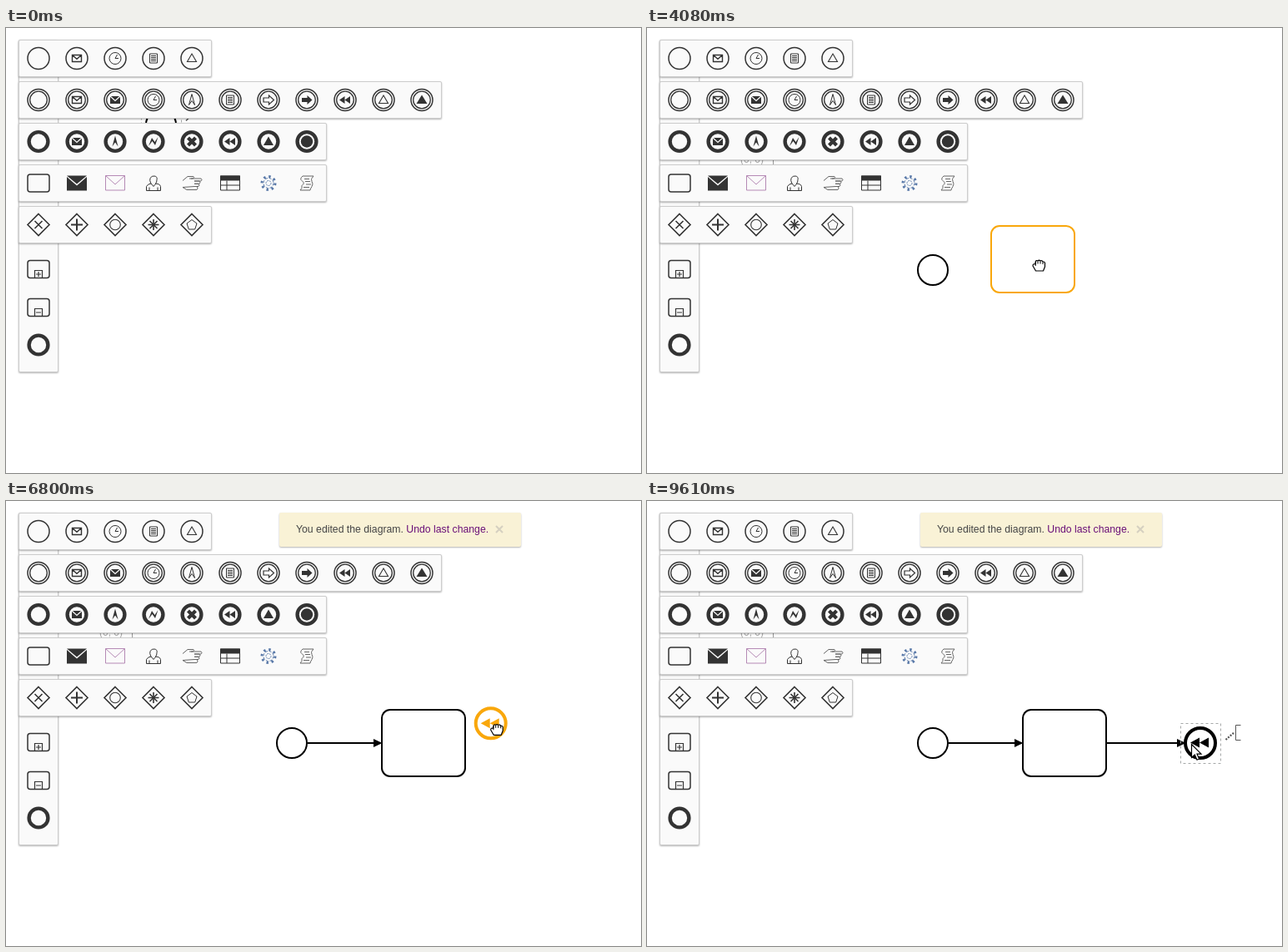
Write an HTML page that moves like this. It is 762 px wide and 535 px high and loops after 9.71 s.

```html
<!DOCTYPE html>
<html lang="en">
<head>
<meta charset="utf-8">
<title>Process modeler</title>
<style>
  html, body { margin: 0; width: 100%; height: 100%; overflow: hidden; background: #fff; }
  #stage { position: relative; width: 762px; height: 535px; overflow: hidden; }
  svg { position: absolute; left: 0; top: 0; }
  .panel {
    position: absolute; left: 15px; box-sizing: border-box; background: #fafafa;
    border: 1px solid #ccc; border-radius: 2px; box-shadow: 0 1px 2px rgba(0, 0, 0, .3);
  }
  .note {
    position: absolute; left: 328px; top: 14px; width: 290px; height: 41px;
    background: #f9f2d6; border-radius: 2px; box-shadow: 0 1px 2px rgba(0, 0, 0, .3);
  }
  .note text { font: 12.25px "Liberation Sans", Arial, sans-serif; fill: #444; }
  .note .link { fill: #6a1078; }
  .icon { fill: none; stroke: currentColor; stroke-width: 1.4; color: #333; }
  .icon .f { fill: currentColor; stroke: none; }
  .icon .w { stroke: #fafafa; }
  .shape { fill: #fff; stroke: #000; stroke-width: 2; }
  .ghost { fill: none; stroke: #f9a70b; color: #f9a70b; stroke-width: 2; }
  .outline { fill: none; stroke: #a5a8a8; stroke-dasharray: 3 3; }
  .pad { fill: none; stroke: #555; }
  .snap { stroke: rgba(255, 195, 66, .5); stroke-width: 2; }
  .edge { stroke: #000; stroke-width: 2; }
  .preview { stroke: #333; stroke-width: 2; stroke-dasharray: 1; }
  .origin { stroke: #999; fill: none; }
  .origin text { font: 12px "Liberation Sans", Arial, sans-serif; fill: #aaa; stroke: none; }
</style>
</head>
<body>
<div id="stage">
  <svg width="762" height="535">
    <g id="origin" class="origin">
      <path d="M151.500 154v20M141 164.500h20"/>
      <text x="140" y="161.500" text-anchor="end">(0, 0)</text>
    </g>
    <g id="edge1" class="edge"><path d="M362 291h80"/><path d="M441 286l10.500 5-10.500 5z" stroke="none"/></g>
    <g id="edge2" class="edge"><path d="M552 291h86"/><path d="M636 286l10.500 5-10.500 5z" stroke="none"/></g>
    <g id="start">
      <circle class="shape" cx="343" cy="291" r="18"/>
      <rect id="startOutline" class="outline" x="319.500" y="267.500" width="48" height="48"/>
      <g id="startPad" class="pad" transform="translate(372 269)"></g>
    </g>
    <g id="task">
      <rect id="taskBox" class="shape" x="451" y="251" width="100" height="80" rx="10"/>
      <rect id="taskOutline" class="outline" x="445.500" y="245.500" width="112" height="92"/>
      <g id="taskPad" class="pad" transform="translate(562 247)"></g>
    </g>
    <g id="end">
      <circle id="endRing" class="shape" cx="664" cy="291" r="18" style="stroke-width:4"/>
      <path d="M652 290.500l11-6v12zM663 290.500l11-6v12z"/>
      <rect id="endOutline" class="outline" x="640.500" y="267.500" width="48" height="48"/>
      <g id="endPad" class="pad" transform="translate(693 245)"></g>
    </g>
    <line id="preview" class="preview" y1="291"/>
    <path id="snapX" class="snap" d="M343 0v535"/>
    <path id="snapY" class="snap" d="M0 291h762"/>
    <rect id="taskGhost" class="ghost" x="-50" y="-40" width="100" height="80" rx="10"/>
    <g id="endGhost" class="ghost">
      <circle r="18" stroke-width="4"/>
      <path d="M-12 0l11-6v12zM-1 0l11-6v12z" fill="currentColor" stroke="none"/>
    </g>
  </svg>
  <div id="panels"></div>
  <svg id="icons" width="762" height="535"></svg>
  <div id="note" class="note">
    <svg width="290" height="41">
      <text x="20" y="24">You edited the diagram. <tspan class="link">Undo last change.</tspan></text>
      <path d="M260 16l8 8M268 16l-8 8" stroke="#d5d0c0" stroke-width="2"/>
    </svg>
  </div>
  <svg width="762" height="535">
    <path id="arrow" d="M.5 .5V16.500L4.300 13 7 19.200 9.600 18 7 12.200H12z" fill="#fff" stroke="#000" stroke-width="1.200"/>
    <g id="fist" fill="#fff" stroke="#000" stroke-width="1.200" stroke-linejoin="round">
      <path d="M3 6Q0 5 0 8L3.500 14H12.500L14.500 9V4.500Q14 2.500 12 3.200 11 1 9 2 7.500 .5 6 2 4 .8 3.300 3z"/>
      <path d="M3.200 3V8M6 2.500V5.500M9 2.500V5.500M12 3.500V6" stroke-width="1"/>
    </g>
  </svg>
</div>
<script>
const LOOP = 9710;
const $ = id => document.getElementById(id);

// Glyphs, each centred on 0,0
const ring = (r, w = 1.5) => `<circle r="${r}" stroke-width="${w}"/>`;
const line = (d, w = 1.2) => `<path d="${d}" stroke-width="${w}"/>`;
const fill = d => `<path class="f" d="${d}"/>`;
const TRI = 'M0-5.500L5.500 4H-5.500z';
const ESC = 'M0-7L3.500 6 0 1-3.500 6z';
const ARROW = 'M-6-2.500H.5V-5.500L6.500 0 .5 5.500V2.500H-6z';
const BOX = 'M-10-10.500H10Q13-10.500 13-7.500V7.500Q13 10.500 10 10.500H-10Q-13 10.500-13 7.500V-7.500Q-13-10.500-10-10.500z';
const mail = line('M-5.500-4H5.500V4H-5.500zM-5.500-4L0 .8 5.500-4', 1.4);
const mailFull = fill('M-6-4.500H6V4.500H-6z') + '<path class="w" d="M-6-4.500L0 1 6-4.500" stroke-width="1.200"/>';
const clock = ring(7, 1) + line('M4 0H0L2.500-4.500', 1);
const doc = line('M-4.500-5.500H4.500V5.500H-4.500zM-3-3H3M-3-1H3M-3 1H3M-3 3H3', 1);
const rewind = fill('M-7 0L-.5-4.500V4.500zM-.5 0L6-4.500V4.500z');
const thin = ring(13);
const double = ring(13) + ring(10.3, 1.3);
const thick = ring(11.4, 4.4);
const diamond = line('M0-13L13 0 0 13-13 0z', 1.6);
const around = (base, list) => list.map(g => base + g);
const cross = w => line('M-4.500-4.500L4.500 4.500M4.500-4.500L-4.500 4.500', w);

const rows = [
  around(thin, ['', mail, clock, doc, line(TRI, 1.1)]),
  around(double, ['', mail, mailFull, clock, line(ESC, 1), doc, line(ARROW), fill(ARROW), rewind,
    line(TRI, 1.1), fill('M0-6L6.500 4.500H-6.500z')]),
  around(thick, ['', mailFull, fill(ESC), fill('M-6 5.500L-2-4.500 1.500 .5 5.500-5.500 2 4.500-1.500-.5z'),
    cross(4.2), rewind, fill('M0-6L6 4.500H-6z'), '<circle class="f" r="7.200"/>']),
  [
    line(BOX, 1.5),
    fill('M-12-9H12L0 1zM-12-7.500L0 3 12-7.500V9H-12z'),
    '<path d="M-11.500-9H11.500V8.500H-11.500zM-11.500-9L0 1.500 11.500-9" stroke="#b58ab5" stroke-width="1"/>',
    line('M-8.500 9V4Q-7 1-3 .5Q-5-3-4-6Q-2-9 1-8.500Q5-8 4-4Q4-1 2.500.5Q8 1 8.500 4V9zM-5 9V5M5 9V5M-3 .5L0 4 3 .5', 1),
    '<path d="M-11-3L-5-8H2Q4-7 1-5.500H-3M-1-5.500H11Q13-4 11-2.500H3M3-2.500H9Q11-1 9 .8H3M3 .8H8Q10 2.500 8 4H3M3 4H6Q8 6 6 8H-6L-11 5z" stroke="#666" stroke-width="1"/>',
    line('M-11.500-8.500H11.500V8.500H-11.500zM-4-3V8.500M-11.500 2.500H11.500', 1) + fill('M-12-9H12V-3H-12z'),
    `<g stroke="#5878a8"><circle r="8" stroke-width="3" stroke-dasharray="2.500 3.780"/>
      <circle r="6" stroke-width="1" stroke-dasharray="3 1.700"/><circle r="3" stroke-width="1" stroke-dasharray="2 1"/></g>`,
    '<path d="M-5-8.500H8Q4-5 6-2T6 4T4 8.500H-8Q-5 6-6 3L-4 1Q-3-1-6-3T-5-8.500M-3-5H3M-2-2H4M-1 1.500H5M-4 5H3" stroke="#666" stroke-width="1"/>'
  ],
  around(diamond, [cross(1.6), line('M0-7V7M-7 0H7', 2), ring(6.3, 1.1),
    line('M0-6.500V6.500M-6.500 0H6.500', 1.6) + cross(1.6),
    line('M0-6L6-1.500 3.700 5.500H-3.700L-6-1.500z', 1)])
];
const sub = mark => line(BOX, 1.5) + line('M-4.500 10.500V1.500H4.500V10.500' + mark, 1.2);
const column = [[290, sub('M-3 6H3M0 3V9')], [336, sub('M-3 6H3')], [381, thick]];

const panel = (y, w, h) => `<div class="panel" style="top:${y}px;width:${w}px;height:${h}px"></div>`;
const icon = (x, y, body, id) => `<g class="icon" id="${id}" transform="translate(${x} ${y})">${body}</g>`;
$('panels').innerHTML = panel(14, 48, 400) +
  rows.map((r, i) => panel(14 + 50 * i, r.length * 46 + 2, 45)).join('');
$('icons').innerHTML =
  rows.map((r, i) => r.map((g, j) => icon(39 + 46 * j, 36.5 + 50 * i, g, `icon${i}_${j}`)).join('')).join('') +
  column.map(([y, g], i) => icon(39, y, g, 'column' + i)).join('');

const annotate = `<path d="M19.500 24.500H13.500V42.500H19.500"/>
  <path d="M1.500 42L12 33" stroke-width="2.200" stroke-dasharray="2 1.500"/>`;
const connect = '<path d="M1 17.500L13 5.500" stroke-width="1.400"/><path d="M18 0L14.800 9 9 3.200z" fill="#444" stroke="none"/>';
$('startPad').innerHTML = $('taskPad').innerHTML = connect + annotate;
$('endPad').innerHTML = annotate;

// Motion: keys are [ms, x, y]
const ease = u => u * u * (3 - 2 * u);
function along(keys, t) {
  const i = keys.findIndex(k => k[0] > t);
  if (i === 0) return keys[0].slice(1);
  if (i < 0) return keys[keys.length - 1].slice(1);
  const [t0, x0, y0] = keys[i - 1], [t1, x1, y1] = keys[i];
  const u = ease((t - t0) / (t1 - t0));
  return [x0 + (x1 - x0) * u, y0 + (y1 - y0) * u];
}
const PAN = [[560, -157, -175], [920, 0, -30], [1200, 0, -30], [1760, 0, 0]];
const POINTER = [
  [2000, 552, 419], [2460, 147, 270], [2970, 55, 287], [3010, 55, 287], [3360, 38, 187],
  [3600, 38, 187], [4080, 463, 278], [4500, 501, 291], [4610, 501, 291],
  [4940, 357, 288], [5020, 357, 288], [5140, 381, 279], [5200, 381, 279], [5570, 505, 279],
  [5950, 505, 279], [6340, 268, 137], [6420, 268, 137], [6920, 634, 289], [7080, 664, 291],
  [7200, 664, 291], [7550, 586, 280], [7920, 535, 286], [8040, 535, 286],
  [8300, 571, 257], [8400, 571, 257], [8910, 662, 294], [9030, 662, 294], [9610, 653, 292]
];

const move = (id, x, y) => $(id).setAttribute('transform', `translate(${x.toFixed(1)} ${y.toFixed(1)})`);

function draw(t) {
  const during = (...spans) => spans.some(([a, b]) => t >= a && t < b);
  const show = (id, ...spans) => { $(id).style.display = during(...spans) ? '' : 'none'; };
  const tint = (id, prop, color, ...spans) => { $(id).style[prop] = during(...spans) ? color : ''; };

  const [px, py] = along(PAN, t);
  move('origin', px, py);
  move('start', px, py);

  const [x, y] = t < 1900 ? [558 + px, 415 + py] : along(POINTER, t);
  move('arrow', x, y);
  move('fist', x, y);
  move('taskGhost', x, y);
  move('endGhost', x, y);
  show('fist', [560, 2000], [3640, 4530], [6460, 7120]);
  show('arrow', [2000, 3640], [4530, 6460], [7120, LOOP]);
  show('taskGhost', [3640, 4530]);
  show('endGhost', [6460, 7120]);

  $('snapX').style.display = during([3640, 4000]) && Math.abs(x - 343) < 8 ? '' : 'none';
  $('snapY').style.display = during([4080, 4530], [6960, 7120]) && Math.abs(y - 291) < 4 ? '' : 'none';

  show('task', [4530, LOOP]);
  show('note', [4530, LOOP]);
  show('end', [7120, LOOP]);
  show('edge1', [5620, LOOP]);
  show('edge2', [9060, LOOP]);

  show('startOutline', [0, 3640], [4900, 5220]);
  show('startPad', [0, 3640], [5000, 5220]);
  show('taskOutline', [4530, 5000], [5440, 5650], [5950, 6440], [7890, 9060]);
  show('taskPad', [4530, 5000], [5950, 6440], [8000, 8420]);
  show('endOutline', [7120, 8000], [8800, LOOP]);
  show('endPad', [7120, 8000], [9570, LOOP]);

  show('preview', [5220, 5620], [8420, 9060]);
  const line = $('preview');
  line.setAttribute('x1', t < 7000 ? 362 : 552);
  line.setAttribute('x2', x);
  line.setAttribute('y2', y);

  tint('taskBox', 'fill', '#dcfecc', [5440, 5620]);
  tint('endRing', 'fill', '#dcfecc', [8800, 9060]);
  tint('column0', 'color', '#ff7400', [2900, 3120]);
  tint('icon3_0', 'color', '#ff7400', [3260, 3640]);
  tint('icon2_5', 'color', '#ff7400', [6310, 6460]);
}

const began = performance.now();
function tick() {
  draw((performance.now() - began) % LOOP);
  requestAnimationFrame(tick);
}
tick();
</script>
</body>
</html>
```
